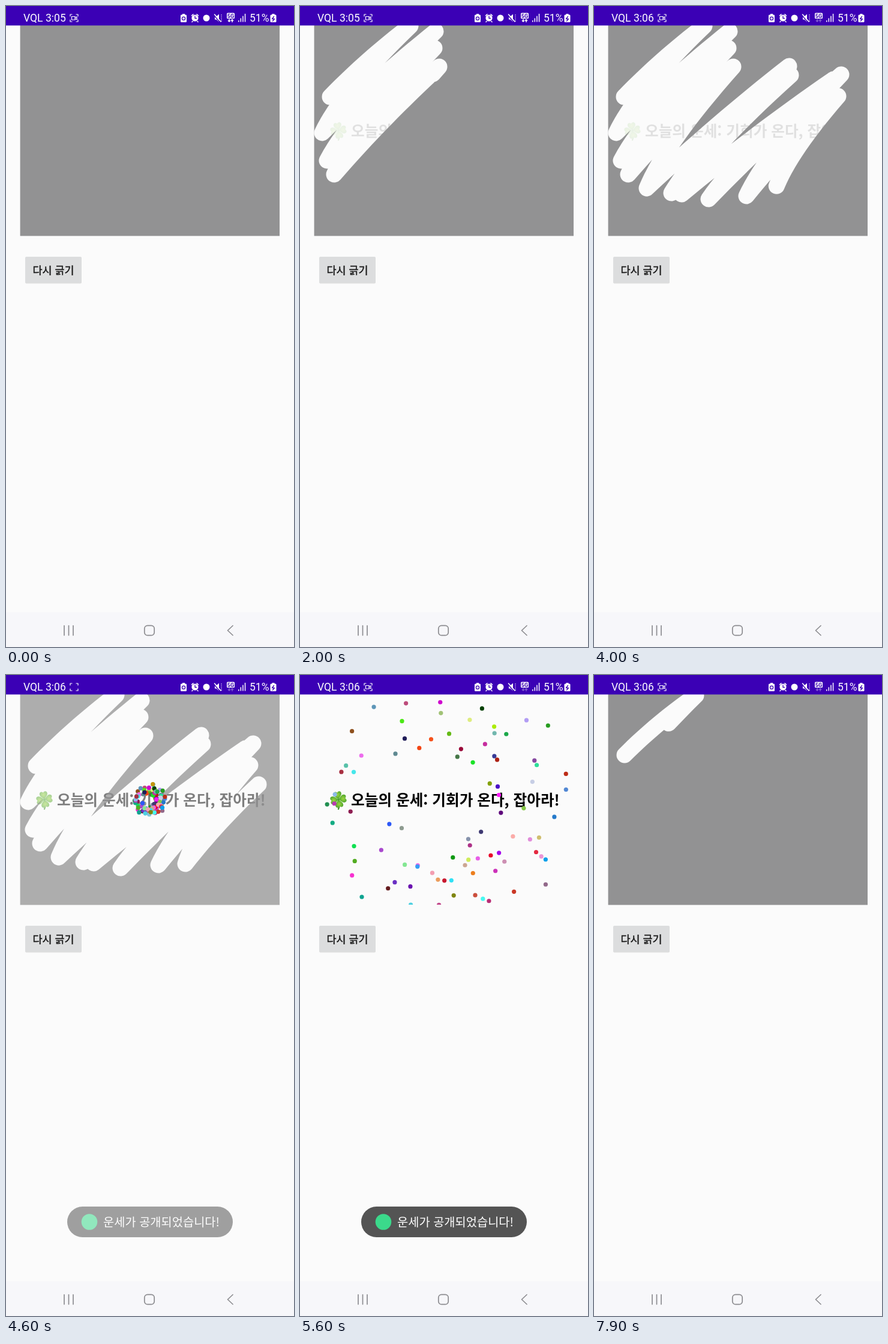
Write an HTML page that moves like this. It is 480 px wide and 1066 px high and loops after 8 s.

```html
<!DOCTYPE html>
<html lang="ko">
<head>
<meta charset="utf-8">
<title>Scratch card</title>
<style>
  html, body { margin: 0; width: 100%; height: 100%; overflow: hidden; background: #fbfbfb; }
  svg { display: block; width: 480px; height: 1066px; }
  .latin { font: 17.5px Roboto, sans-serif; fill: #fff; }
  .ko { font-family: "Noto Sans CJK KR", "Noto Sans CJK", sans-serif; }
  .fortune { font-size: 24.67px; font-weight: 700; }
  .button { font-size: 17.4px; fill: #1c1c1c; stroke: #1c1c1c; stroke-width: .45px; text-anchor: middle; }
  .toast { font-size: 19.8px; fill: #fff; }
  .network { font: 700 9px Roboto, sans-serif; fill: #3b00b5; text-anchor: middle; }
  .stroke { fill: none; stroke-linecap: round; stroke-linejoin: round; }
</style>
</head>
<body>
<svg viewBox="0 0 480 1066">
  <defs>
    <mask id="scratched" maskUnits="userSpaceOnUse" x="0" y="0" width="480" height="400">
      <rect width="480" height="400" fill="#fff"/>
      <path id="trail" class="stroke" stroke="#000" stroke-width="27"/>
    </mask>
    <clipPath id="card"><rect x="24" y="32" width="432" height="350"/></clipPath>
    <radialGradient id="leafFill" gradientUnits="userSpaceOnUse" cx="0" cy="-8" r="9">
      <stop offset="0" stop-color="#9bd63f"/><stop offset="1" stop-color="#3a962a"/>
    </radialGradient>
    <path id="leaf" fill="url(#leafFill)" d="M0 0C-3-4-7-6-6.500-10C-6-14-2-14 0-11.500C2-14 6-14 6.500-10C7-6 3-4 0 0Z"/>
    <g id="battery">
      <rect x="-2" y="-7" width="4" height="3"/>
      <rect x="-5" y="-5.500" width="10" height="12.500" rx="1.500"/>
    </g>
  </defs>

  <rect width="480" height="1066" fill="#fbfbfb"/>

  <g id="fortune">
    <g transform="translate(64 207)">
      <path class="stroke" stroke="#3f9128" stroke-width="2.300" d="M0 0Q3 9 0 16"/>
      <g id="clover" transform="rotate(-10)"></g>
    </g>
    <text class="ko fortune" x="85" y="217">오늘의 운세: 기회가 온다, 잡아라!</text>
  </g>

  <rect id="cover" x="23.600" y="32" width="432.400" height="350.400" fill="#929293" mask="url(#scratched)"/>
  <g id="confetti" clip-path="url(#card)"></g>

  <rect x="32" y="418" width="94" height="43.500" rx="2" fill="#000" opacity=".12"/>
  <rect x="32" y="417" width="94" height="43" rx="2" fill="#dcddde"/>
  <text class="ko button" x="79" y="445.500">다시 긁기</text>

  <g id="toast">
    <rect x="102" y="884" width="276" height="51" rx="25.500" fill="#545454"/>
    <circle cx="139" cy="909.500" r="13.300" fill="#3bd98b"/>
    <text class="ko toast" x="162" y="917">운세가 공개되었습니다!</text>
  </g>

  <!-- status bar -->
  <rect width="480" height="32.400" fill="#3b00b5"/>
  <text class="latin" x="29" y="26">VQL</text>
  <text class="latin" id="clock" x="66" y="26">3:05</text>
  <text class="latin" x="406" y="26">51%</text>
  <g class="stroke" stroke="#fff" stroke-width="1.200">
    <path d="M107 17V14H110M117 14H120V17M120 23V26H117M110 26H107V23"/>
    <path id="camera" d="M109.500 17.500H115V23H109.500ZM115 19.500L118 18V22.500L115 21"/>
  </g>
  <g id="signal" fill="#fff">
    <use href="#battery" x="296" y="20"/>
    <use href="#battery" x="445.500" y="20"/>
    <circle cx="315" cy="20" r="5.600"/>
    <circle cx="334" cy="20" r="5.500"/>
    <path d="M348 17.500H350.500L355 13.500V26.500L350.500 22.500H348Z"/>
    <rect x="368" y="11.500" width="13" height="9.500" rx="1.500"/>
  </g>
  <g class="stroke" stroke="#fff" stroke-width="1.600">
    <path d="M309.500 16L312 13.800M320.500 16L318 13.800M311 25.500L310 26.500M319 25.500L320 26.500"/>
    <path d="M359 15V25" stroke-dasharray="0 3.300"/>
    <path d="M347.500 14L358 26"/>
    <path id="arrows" d="M372 22V26L370.500 24.500M372 26L373.500 24.500M377 26.500V22.500L375.500 24M377 22.500L378.500 24"/>
  </g>
  <g class="stroke" stroke="#3b00b5" stroke-width="1.300">
    <circle cx="296" cy="20.700" r="2.600"/>
    <path d="M315 17V20.500H317.500M346.500 15.500L357 27.500M446.500 17.500L443.500 21.500H447.500L444.500 25"/>
  </g>
  <text class="network" x="374.500" y="19.500">5G</text>

  <!-- navigation bar -->
  <rect y="1008" width="480" height="58" fill="#f7f7fa"/>
  <g id="nav" class="stroke" stroke="#8c8c90" stroke-width="1.700">
    <path d="M378 1030.500L369.500 1038.500L378 1046.500"/>
    <rect x="230.800" y="1030.300" width="16.400" height="16.400" rx="5"/>
  </g>
</svg>
<script>
const LOOP = 8000, STEP = 100, RESET = 7100, REVEAL = 4430, BURST = 4455, LIFE = 1500;
const $ = id => document.getElementById(id);

function add(parent, tag, attributes) {
  const node = document.createElementNS("http://www.w3.org/2000/svg", tag);
  for (const name in attributes) node.setAttribute(name, attributes[name]);
  $(parent).append(node);
  return node;
}

for (let i = 0; i < 4; i++) {
  const height = 2.5 + 3.7 * i;
  add("clover", "use", { href: "#leaf", transform: `rotate(${90 * i})` });
  add("signal", "rect", { x: 387 + 3.6 * i, y: 26.5 - height, width: 1.5, height });
}
for (let i = 0; i < 3; i++) add("nav", "path", { d: `M${97 + 7.5 * i} 1030.5v16` });

// The finger swings between these turning points, spending the same time on each leg.
const firstSwipe = {
  start: 700, leg: 184.5,
  turns: [
    [50, 151], [184, 33], [37, 211], [226, 42], [45, 257], [224, 70], [57, 280],
    [232, 101], [88, 303], [325, 100], [129, 311], [328, 115], [146, 313],
    [399, 122], [191, 321], [412, 114], [254, 316], [407, 150], [299, 314], [421, 182]
  ]
};
const secondSwipe = { start: 7690, leg: 170, turns: [[51, 133], [170, 34], [37, 200]] };

const clamp = (v, max = 1) => Math.min(max, Math.max(0, v));
const ramp = (t, from, to) => clamp((t - from) / (to - from));
const smooth = p => (1 - Math.cos(Math.PI * p)) / 2;

// Each leg bows to the upper left, downward legs more and later.
function fingerAt(turns, u) {
  const leg = Math.min(Math.floor(u), turns.length - 2);
  const [ax, ay] = turns[leg], [bx, by] = turns[leg + 1];
  const [bow, bend] = by > ay ? [13, 0.7] : [5, 0.5];
  const k = u - leg, wa = (1 - k) ** 2, wc = 2 * k * (1 - k), wb = k * k;
  const cx = ax + (bx - ax) * bend - bow, cy = ay + (by - ay) * bend - bow;
  return [wa * ax + wc * cx + wb * bx, wa * ay + wc * cy + wb * by];
}

function trailAt({ start, leg, turns }, t) {
  if (t < start) return "";
  const end = clamp((t - start) / leg, turns.length - 1);
  const path = [];
  for (let u = 0; u < end; u += 1 / 16) path.push(fingerAt(turns, u));
  path.push(fingerAt(turns, end));
  return "M" + path[0] + "L" + path.join("L");
}

function seeded(seed) {
  return () => {
    seed = (seed + 0x6D2B79F5) | 0;
    let n = Math.imul(seed ^ (seed >>> 15), 1 | seed);
    n = (n + Math.imul(n ^ (n >>> 7), 61 | n)) ^ n;
    return ((n ^ (n >>> 14)) >>> 0) / 4294967296;
  };
}

const random = seeded(17);
const channel = () => Math.floor(random() * 256);
const particles = Array.from({ length: 90 }, () => {
  const dot = add("confetti", "circle", { r: 3.6, fill: `rgb(${channel()},${channel()},${channel()})` });
  const angle = random() * 2 * Math.PI, speed = 0.065 + random() * 0.128;
  return { dot, vx: Math.cos(angle) * speed, vy: Math.sin(angle) * speed };
});

function drawConfetti(age) {
  const alive = age > 0 && age < LIFE;
  $("confetti").style.display = alive ? "" : "none";
  if (!alive) return;
  $("confetti").style.opacity = 1 - ramp(age, LIFE - 300, LIFE);
  for (const { dot, vx, vy } of particles) {
    dot.setAttribute("cx", 239 + vx * age);
    dot.setAttribute("cy", 208 + vy * age);
  }
}

function draw(t) {
  const reset = t >= RESET;
  $("trail").setAttribute("d", trailAt(reset ? secondSwipe : firstSwipe, t));
  $("cover").style.opacity = reset ? 1 : 1 - smooth(ramp(t, REVEAL, REVEAL + 500));
  $("fortune").style.opacity = reset ? 0.1 : 0.1 + 0.9 * smooth(ramp(t, REVEAL, REVEAL + 370));
  $("toast").style.opacity = ramp(t, 4490, 4690) - ramp(t, 6850, 7100);
  $("clock").textContent = t < 2800 ? "3:05" : "3:06";
  $("camera").style.opacity = t >= 4300 && t < 4800 ? 0 : 1;
  $("arrows").style.opacity = t < 2500 ? 1 : 0.35;
  drawConfetti(t - BURST);
}

let start;
function tick(now) {
  start ??= now;
  draw(Math.floor(((now - start) % LOOP) / STEP) * STEP);
  requestAnimationFrame(tick);
}
draw(0);
requestAnimationFrame(tick);
</script>
</body>
</html>
```
